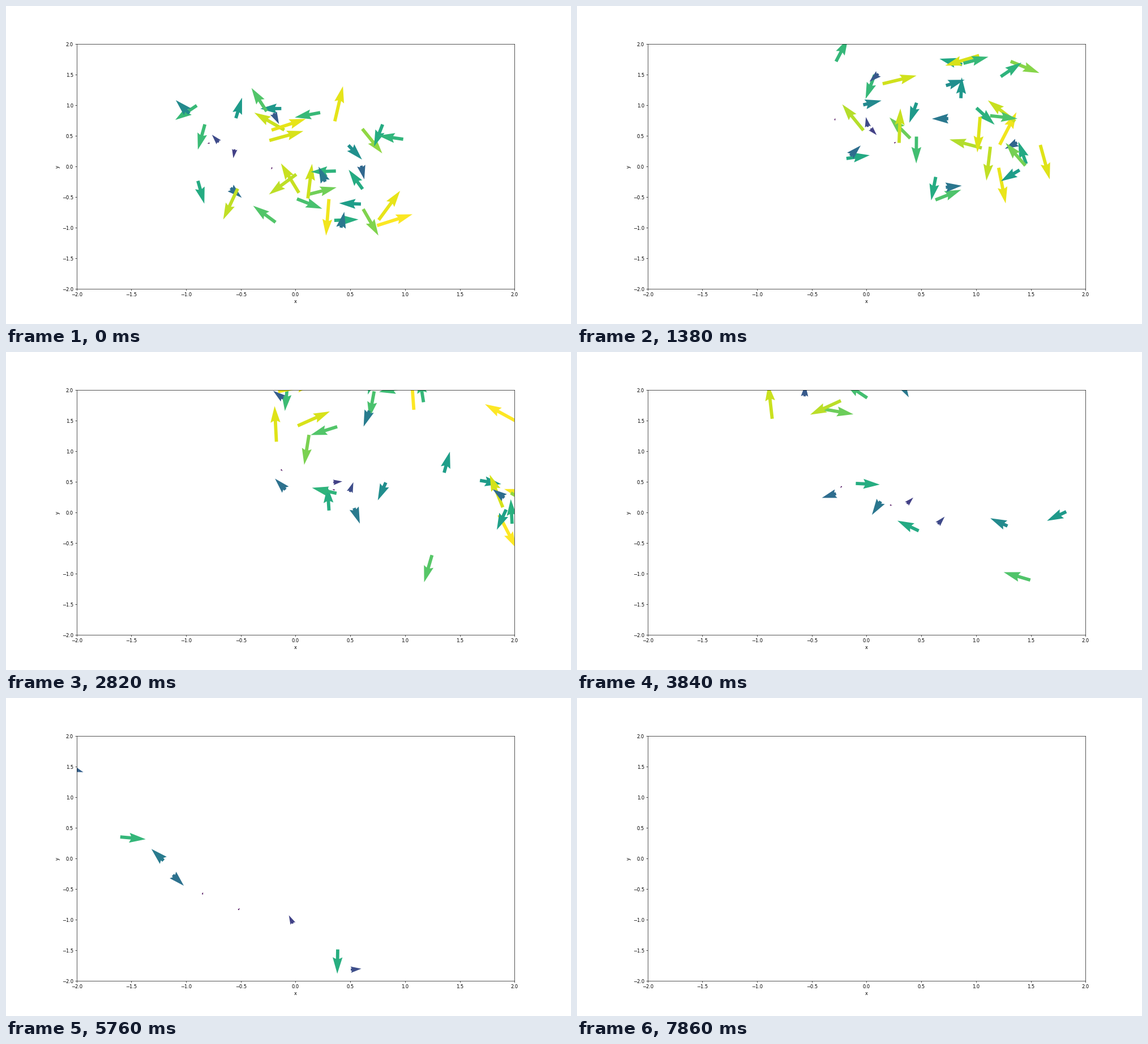
Animation of 998x561 px, one loop 8 s. Source, as a matplotlib script:

```python
import numpy as np
import matplotlib.pyplot as plt
from matplotlib.animation import FuncAnimation

W, H, DPI = 998, 561, 60
N = 40
LAST_STEP = 131
STEP_MS, TICK_MS, LOOP_MS = 60, 40, 8000
SHORTEST, LONGEST = 4, 66  # arrow length in pixels

rng = np.random.default_rng(5)

start = rng.uniform(-1, 1, (N, 2))
length = np.maximum(LONGEST * np.sqrt(rng.uniform(0, 1, N)), SHORTEST)
heading = rng.uniform(0, 2 * np.pi, N)
spin = rng.normal(0, 0.1, N)
swell = rng.uniform(0.02, 0.06, N)

# Fast arrows and those nearer the upper right leave first
haste = length + 20 * start.sum(axis=1) + rng.normal(0, 10, N)
rank = np.argsort(np.argsort(-haste))
leave = np.interp(rank, [0, 3, 7, 20, 31, N - 1], [30, 37, 47, 64, 96, 125])
late = leave / leave.max()

# Exits fan out from the upper right towards the lower left
side = np.where(rank % 2, 1, -1)
fan = np.radians(45 + 182 * late**2 * side + 40 * (1 - late) * rng.uniform(-1, 1, N))
ray = np.column_stack([np.cos(fan), np.sin(fan)])
exit_point = 2.05 * ray / np.abs(ray).max(axis=1, keepdims=True)
travel = exit_point - start


def pose(step):
    s = (step / leave)[:, None]
    drift = late[:, None] * np.maximum(4 * s * (1 - s), 0)
    place = start + travel * s**1.4 + drift
    size = length * (1 + swell * np.sin(0.15 * step))
    angle = heading + spin * step
    return place, size * np.cos(angle), size * np.sin(angle), size


fig, ax = plt.subplots(figsize=(W / DPI, H / DPI), dpi=DPI)
ticks = np.arange(-2, 2.1, 0.5)
ax.set(xlim=(-2, 2), ylim=(-2, 2), xlabel="x", ylabel="y", xticks=ticks, yticks=ticks)

place, u, v, size = pose(0)
field = ax.quiver(*place.T, u, v, size, cmap="viridis", scale=1,
                  scale_units="dots", minlength=0.5)
field.set_clim(SHORTEST, LONGEST)


def update(tick):
    step = min((tick * TICK_MS + TICK_MS // 2) // STEP_MS, LAST_STEP)
    place, u, v, size = pose(step)
    field.set_offsets(place)
    field.set_UVC(u, v, size)
    return (field,)


anim = FuncAnimation(fig, update, frames=LOOP_MS // TICK_MS, interval=TICK_MS,
                     repeat=True, repeat_delay=0, blit=False)
plt.show()
```
